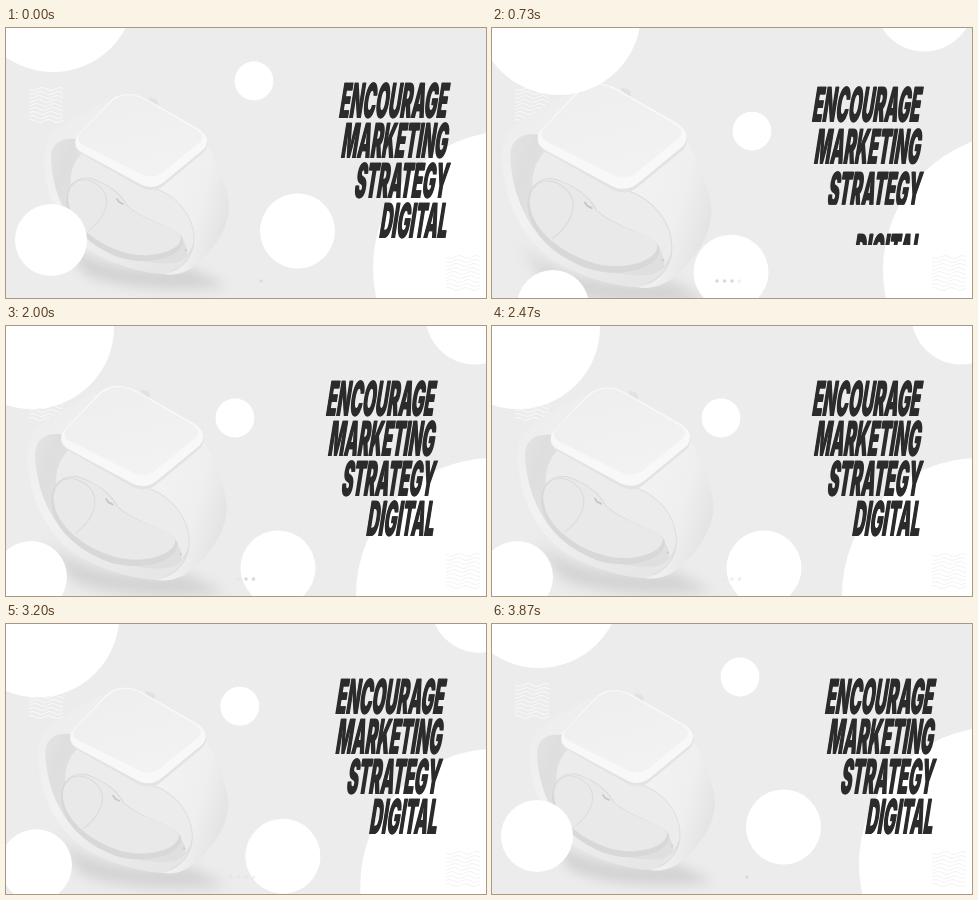
Recreate the animation shown at these times as an HTML page. Size 480 px wide and 270 px high, loop 3940 ms.

```html
<!DOCTYPE html>
<html lang="en">
<head>
<meta charset="utf-8">
<title>Encourage marketing strategy digital</title>
<style>
  html, body { margin: 0; width: 100%; height: 100%; overflow: hidden; background: #ececec; }
  svg { display: block; width: 100vw; height: 100vh; }
  text { font: 900 48.5px Inter, "Liberation Sans", sans-serif; text-anchor: end; fill: #2b2b2b; }
</style>
</head>
<body>
<svg viewBox="0 0 480 270">
  <defs>
    <linearGradient id="strap" x1="0" y1="0" x2=".7" y2="1">
      <stop offset="0" stop-color="#ececec"/>
      <stop offset=".5" stop-color="#f2f2f2"/>
      <stop offset="1" stop-color="#e6e6e6"/>
    </linearGradient>
    <linearGradient id="inner" x1="0" y1="0" x2="1" y2=".3">
      <stop offset="0" stop-color="#e3e3e3"/>
      <stop offset=".15" stop-color="#dedede"/>
      <stop offset=".5" stop-color="#e6e6e6"/>
      <stop offset="1" stop-color="#dfdfdf"/>
    </linearGradient>
    <linearGradient id="side" x1="0" y1=".2" x2="1" y2=".7">
      <stop offset="0" stop-color="#f3f3f3"/>
      <stop offset=".6" stop-color="#efefef"/>
      <stop offset="1" stop-color="#e1e1e1"/>
    </linearGradient>
    <linearGradient id="glass" x1="0" y1="0" x2=".4" y2="1">
      <stop offset="0" stop-color="#eeeeee"/>
      <stop offset="1" stop-color="#f2f2f2"/>
    </linearGradient>
    <pattern id="grid" width="5" height="5" patternUnits="userSpaceOnUse">
      <circle cx="2.5" cy="2.5" r=".6" fill="#fff"/>
    </pattern>
    <filter id="soft" x="-50%" y="-50%" width="200%" height="200%"><feGaussianBlur stdDeviation="6"/></filter>
  </defs>
  <rect width="480" height="270" fill="#ececec"/>
  <path id="wavesL" fill="none" stroke="#fff" stroke-width=".7"/>
  <rect x="290" y="25" width="155" height="190" fill="url(#grid)" opacity=".3"/>

  <g id="watch">
    <path fill="#d3d3d3" filter="url(#soft)" d="M52 205 C72 232 120 246 185 240 L222 258 C180 264 110 262 78 246 Z"/>
    <!-- left strap and the inside of the loop -->
    <path fill="url(#strap)" d="M100 72 C84 82 62 92 48 104 C38 112 36 130 39 146 C43 176 58 204 80 220 C104 236 140 247 164 246 L190 236 L150 110 Z"/>
    <path fill="url(#inner)" d="M70 111 C54 109 45 116 45 130 C46 160 58 190 78 208 C104 228 150 240 172 234 C188 228 192 212 187 198 C180 180 166 166 148 160 L74 122 Z"/>
    <path fill="#ececec" d="M77 124 C67 134 63 146 65 160 L120 180 C138 196 168 198 176 210 C180 218 182 222 181 227 C188 218 190 210 187 198 C180 180 166 166 148 160 Z"/>
    <!-- clasp and tongue -->
    <path fill="#d8d8d8" d="M60 172 C61 155 73 146 88 151 C104 157 116 166 122 178 C140 194 172 199 177 211 C179 230 140 239 112 229 C82 217 60 196 60 172 Z"/>
    <path fill="#e9e9e9" d="M62 169 C64 153 75 147 88 152 C103 157 114 166 121 178 C138 194 170 198 175 209 C176 224 140 233 114 223 C85 213 62 192 62 169 Z"/>
    <path fill="none" stroke="#dbdbdb" d="M66 158 C72 148 86 151 95 160 C106 171 100 190 82 203"/>
    <path fill="none" stroke="#c4c4c4" stroke-width="1.6" stroke-linecap="round" d="M111 171 L113 174 L117 176"/>
    <!-- right strap -->
    <path fill="url(#side)" d="M148 160 L200 115 C212 134 223 163 223 180 C222 204 204 226 187 239 C179 245 168 248 158 246 C176 243 188 230 188 212 C188 188 170 166 148 160 Z"/>
    <path fill="none" stroke="#dcdcdc" stroke-width=".9" d="M150 161 C171 168 188 188 188 211 C188 225 180 237 166 243"/>
    <circle cx="180" cy="222" r="1.2" fill="#d0d0d0"/>
    <!-- case -->
    <path fill="#e2e2e2" d="M143 69 L150 71 Q153 74 151 79 L143 77 Z"/>
    <path fill="#e3e3e3" d="M70 112 Q67 120 74 125 L136 160 Q148 165 157 158 L198 124 Q204 117 200 110 Z"/>
    <path fill="#f8f8f8" d="M71 108 L103 74 Q111 65 125 66 Q134 67 144 73 L193 101 Q206 110 198 121 L158 154 Q148 162 136 157 L75 124 Q66 118 71 108 Z"/>
    <path fill="url(#glass)" d="M73 107 L104 75 Q112 67 125 67 Q133 68 143 74 L191 102 Q200 108 194 114 L156 145 Q147 151 137 147 L77 117 Q70 113 73 107 Z"/>
  </g>

  <g id="discs" fill="#fff"></g>
  <path id="wavesR" fill="none" stroke="#efefef" stroke-width=".8"/>
  <g id="dots" fill="#d9d9d9"></g>
  <g id="lines"></g>
</svg>
<script>
const LOOP = 3940, CUT = 70;
const $ = id => document.getElementById(id);

function add(parent, tag, attrs) {
  const el = document.createElementNS("http://www.w3.org/2000/svg", tag);
  for (const k in attrs) el.setAttribute(k, attrs[k]);
  return parent.appendChild(el);
}

const clamp = v => Math.min(1, Math.max(0, v));
const part = (t, start, span) => clamp((t - start) / span);
const outQuint = p => 1 - (1 - p) ** 5;
const inOutSine = p => (1 - Math.cos(Math.PI * p)) / 2;

// Rest place, radius, way in (from) and way out (exit)
const discs = [
  { x: 26,  y: 1,   r: 82,   from: [385, -150], exit: [21, -39] },
  { x: 229, y: 92,  r: 19.4, from: [291, 104],  exit: [19, -39] },
  { x: 272, y: 242, r: 37.5, from: [-310, 20],  exit: [19.5, -39] },
  { x: 25,  y: 251, r: 36,   from: [338, 254],  exit: [20, -39] },
  { x: 487, y: 269, r: 137,  from: [385, -252], exit: [17, -29] },
  { x: 469, y: -11, r: 49.5, from: [-346, -140], exit: [19, -39] }
].map(d => ({ ...d, el: add($("discs"), "circle", { r: d.r }) }));

const PITCH = 40.2;
const lines = [["ENCOURAGE", 355], ["MARKETING", 408], ["STRATEGY", 460], ["DIGITAL", 664]]
  .map(([word, start], i) => {
    const base = 89.8 + i * PITCH;
    const clip = add(document.querySelector("defs"), "clipPath", { id: "clip" + i });
    add(clip, "rect", { x: 280, y: base - 40, width: 200, height: 46.5 });
    const box = add($("lines"), "g", { "clip-path": `url(#clip${i})` });
    const el = add(box, "g", {});
    // two close copies thicken the upright strokes
    for (const dx of [-0.3, 0.3])
      add(el, "text", { transform: `translate(${426.8 + dx} ${base}) skewX(-9) scale(.346 1)` }).textContent = word;
    return { el, start, i };
  });

function waves(x0, y0) {
  let d = "";
  for (let row = 0; row < 9; row++)
    for (let x = 0; x <= 34; x += 2) {
      const y = y0 + row * 4 + 1.4 * Math.sin(x * 0.36 + row * 0.5);
      d += (x ? "L" : "M") + (x0 + x) + " " + y.toFixed(2);
    }
  return d;
}
$("wavesL").setAttribute("d", waves(23, 61));
$("wavesR").setAttribute("d", waves(440, 229));

// Opacity of each dot at the given times
const dotTimes = [70, 730, 1270, 2000, 2800, 3200, 3800];
const dots = [
  [0, 1, 0, 0, 0, .3, 0],
  [0, 1, 0, .2, .1, .3, 0],
  [0, 1, 0, 1, .1, .3, 0],
  [0, .4, 1, 1, .1, .3, 0],
  [0, 0, 1, 0, 0, 0, .9]
].map((levels, i) => ({ levels, el: add($("dots"), "circle", { cx: 225 + i * 7.5, cy: 253, r: 1.8 }) }));

function level(values, t) {
  let i = 0;
  while (i < dotTimes.length - 2 && t > dotTimes[i + 1]) i++;
  const p = part(t, dotTimes[i], dotTimes[i + 1] - dotTimes[i]);
  return values[i] + (values[i + 1] - values[i]) * p;
}

function draw(time) {
  let t = time % LOOP;
  if (t < CUT) t = LOOP; // the closing pose holds until the cut

  const zoom = 1 + 0.13 * Math.max(0, 3870 - t) / 3140;
  $("watch").setAttribute("transform", `translate(250 144) scale(${zoom}) translate(-250 -144)`);

  const away = 1 - outQuint(part(t, CUT, 1830));
  const leave = part(t, 2640, 1120) ** 2;
  for (const d of discs) {
    d.el.setAttribute("cx", d.x + d.from[0] * away + d.exit[0] * leave);
    d.el.setAttribute("cy", d.y + d.from[1] * away + d.exit[1] * leave);
  }

  for (const l of lines) {
    const dy = 43 * (1 - outQuint(part(t, l.start, 1000)));
    const dx = 13 * inOutSine(part(t, 2640 + l.i * 95, 850));
    l.el.setAttribute("transform", `translate(${dx} ${dy})`);
  }

  for (const d of dots) d.el.setAttribute("opacity", level(d.levels, t));
}

const begin = performance.now();
function tick() {
  draw(performance.now() - begin);
  requestAnimationFrame(tick);
}
draw(0);
requestAnimationFrame(tick);
</script>
</body>
</html>
```
